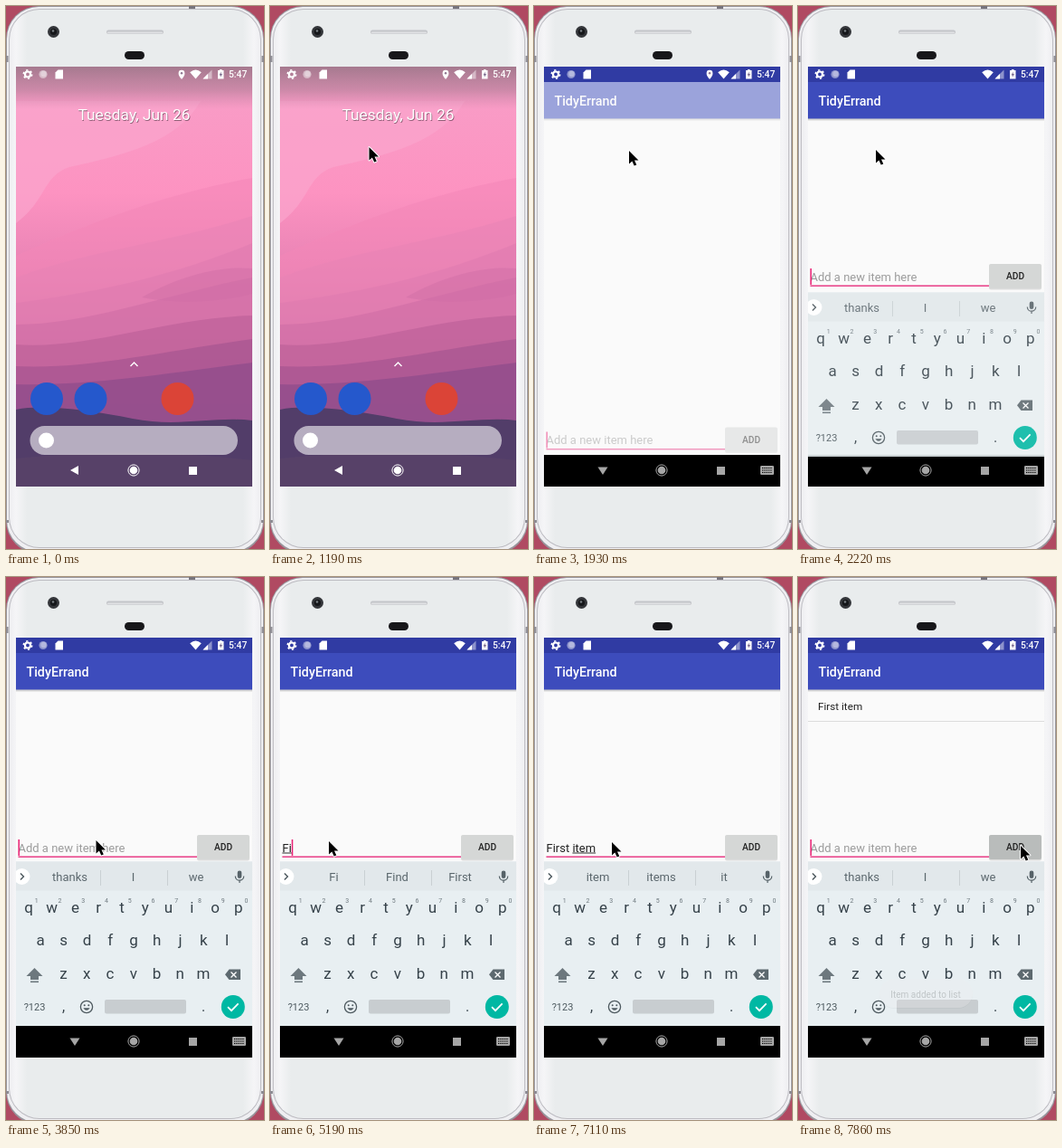
These frames come from a looping animation (285x600 px, 8 s). An HTML page:

```html
<!DOCTYPE html>
<html lang="en">
<head>
<meta charset="utf-8">
<title>To-do app on a phone</title>
<style>
  html, body { margin: 0; width: 100%; height: 100%; overflow: hidden; background: #b04a62; }
  svg { display: block; width: 100vw; height: 100vh; font-family: Roboto, sans-serif; }
  .mid { text-anchor: middle; }
  .med { font-weight: 500; }
</style>
</head>
<body>
<svg id="stage" viewBox="0 0 285 600" xmlns="http://www.w3.org/2000/svg"></svg>
<script>
const LOOP = 8000, STEP = 148, LAST = 53;

const text = (x, y, size, fill, str, more = '') =>
  `<text x="${x}" y="${y}" font-size="${size}" fill="${fill}" ${more}>${str}</text>`;
const rect = (x, y, w, h, fill, more = '') =>
  `<rect x="${x}" y="${y}" width="${w}" height="${h}" fill="${fill}" ${more}/>`;
const disc = (x, y, r, fill, more = '') =>
  `<circle cx="${x}" cy="${y}" r="${r}" fill="${fill}" ${more}/>`;
const path = (d, fill, more = '') => `<path d="${d}" fill="${fill}" ${more}/>`;
const stroke = (d, color, w = 1, more = '') =>
  `<path d="${d}" fill="none" stroke="${color}" stroke-width="${w}" ${more}/>`;
const fade = (id, stops) =>
  `<linearGradient id="${id}" x2="0" y2="1">${stops.map(([o, c, a = 1]) =>
    `<stop offset="${o}" stop-color="${c}" stop-opacity="${a}"/>`).join('')}</linearGradient>`;

function defs() {
  return `<defs>
    ${fade('sky', [[0, '#f79fc8'], [.3, '#fd93c1'], [.5, '#e681b3'], [.62, '#c8689d'], [.7, '#a8538c'], [.78, '#7f4686'], [.84, '#644184'], [1, '#5a4370']])}
    ${fade('scrim', [[0, '#6f6068', .6], [.55, '#7d6672', .36], [1, '#a07088', 0]])}
    ${fade('drop', [[0, '#000', .22], [1, '#000', 0]])}
    <linearGradient id="shell">
      <stop offset="0" stop-color="#eeeef1"/><stop offset=".025" stop-color="#f5f5f7"/>
      <stop offset=".07" stop-color="#e9eced"/><stop offset=".93" stop-color="#e9eced"/>
      <stop offset=".975" stop-color="#f5f5f7"/><stop offset="1" stop-color="#eeeef1"/>
    </linearGradient>
    <clipPath id="glass"><rect x="11" y="67" width="261" height="464"/></clipPath>
  </defs>`;
}

function phone() {
  return rect(0, 0, 285, 600, '#b04a62')
    + rect(0, 0, 285, 605, '#98959c', 'rx="36"')
    + rect(1, 1, 283, 602, '#efeff2', 'rx="35"')
    + rect(3, 3, 279, 596, '#bcbbc1', 'rx="34"')
    + rect(4, 4, 277, 594, 'url(#shell)', 'rx="33"')
    + rect(202, 0, 7, 3, '#77747c') + rect(0, 55, 2.5, 7, '#8d8b92') + rect(282.5, 55, 2.5, 7, '#8d8b92')
    + rect(0, 568, 3, 3, '#8d8b92') + rect(282, 568, 3, 3, '#8d8b92')
    + disc(52.5, 28.5, 6.5, '#34363a') + disc(52.5, 28.5, 3.6, '#15171a') + disc(52, 27.5, 1.3, '#777d82')
    + rect(111, 26.5, 63, 4.5, '#c3c5c9', 'rx="2.2"') + rect(112, 28.5, 61, 2, '#e0e1e4', 'rx="1"')
    + rect(131, 50, 22, 9, '#17171a', 'rx="4.5"');
}

function wallpaper() {
  const bands = [
    [276, 240, 206, 190, '#f487b8', .55], [300, 270, 262, 232, '#e883b5', .5],
    [328, 318, 300, 262, '#dd7bb0', .5], [352, 352, 318, 300, '#cc6ba3', .5],
    [374, 380, 344, 342, '#b65a94', .5], [398, 402, 380, 368, '#9c4e8c', .5],
    [418, 420, 406, 394, '#804788', .5]
  ];
  return rect(11, 67, 261, 464, 'url(#sky)')
    + path('M11 105H215C190 150 130 165 70 178C40 188 45 215 11 240Z', '#fba6cd', 'opacity=".7"')
    + bands.map(([a, b, c, d, fill, o]) =>
        path(`M11 ${a}C90 ${b} 180 ${c} 272 ${d}V531H11Z`, fill, `opacity="${o}"`)).join('')
    + path('M150 322C180 304 230 286 272 290V318C230 330 180 328 150 322Z', '#cf6ea4', 'opacity=".45"')
    + path('M11 446C40 440 90 446 140 456S230 453 272 458V531H11Z', '#523d69')
    + path('M11 500Q140 486 272 502V531H11Z', '#5b4468', 'opacity=".7"')
    + rect(11, 67, 261, 47, 'url(#scrim)');
}

function launcher() {
  return wallpaper()
    + text(142.2, 127, 17.4, '#4c3040', 'Tuesday, Jun 26', 'class="mid" opacity=".6"')
    + text(141.5, 126, 17.4, '#fff', 'Tuesday, Jun 26', 'class="mid"')
    + stroke('M137.5 398l4-4 4 4', '#fff', 1.4)
    + disc(45, 434, 18, '#2558cc') + disc(93.5, 434, 18, '#2558cc') + disc(189.5, 434, 18, '#db4437')
    + rect(26.5, 464, 229.5, 32, '#fff', 'rx="16" opacity=".58"')
    + disc(44.5, 480, 8.5, '#fff');
}

const homeKeys = color =>
  disc(141, 513, 4.3, color) + disc(141, 513, 6.1, 'none', `stroke="${color}" stroke-width="1"`)
  + rect(202, 509, 9, 9, color);

function navBar() {
  const grey = '#a6a6a6';
  const keys = [0, 1, 2].map(r =>
    stroke(`M252 ${510.5 + r * 2.5}H263`, '#000', 1.2, 'stroke-dasharray="1.3 1"')).join('');
  return rect(11, 496, 261, 35, '#000')
    + path('M70.5 509.5H81.5L76 518Z', grey) + homeKeys(grey)
    + rect(250, 508, 15, 10, grey, 'rx="1.2"') + keys;
}

function statusIcons() {
  const w = '#fff';
  return disc(24, 75.5, 3, 'none', 'stroke="#fff" stroke-width="2.2"')
    + disc(24, 75.5, 4.7, 'none', 'stroke="#fff" stroke-width="1.6" stroke-dasharray="2.2 2.72"')
    + disc(41, 75.5, 4.6, w, 'opacity=".45"') + disc(41.5, 75, 3.2, w, 'opacity=".35"')
    + path('M57.5 70.5H63V80.5H54.5V73.5Z', w)
    + `<g id="pin">${path('M194 81C191 77.5 190.6 76 190.6 74.2A3.4 3.4 0 0 1 197.4 74.2C197.4 76 197 77.5 194 81Z', w)}${disc(194, 74.2, 1.2, '#8f7690')}</g>`
    + path('M203.2 73.2Q209.5 67.6 215.8 73.2L209.5 80.6Z', w)
    + path('M217.5 80.5L227.5 70.5V80.5Z', w, 'opacity=".45"') + path('M217.5 80.5L223 75V80.5Z', w)
    + path('M236 70H238.5V71H240.5V80.5H234V71H236Z', w) + path('M237.8 72.5L235.5 76.5H237L236.7 79L239 75H237.5Z', '#77688c')
    + text(246, 79.2, 10.3, w, '5:47', 'class="med"');
}

function appBody() {
  return rect(11, 84, 261, 40.5, '#3d4cbc')
    + rect(11, 124.5, 261, 3, 'url(#drop)')
    + text(22.5, 110, 14.3, '#fff', 'TidyErrand', 'class="med"')
    + `<g id="row">${text(22, 146.5, 11.7, '#222', 'First item')}${rect(11, 159, 261, 1, '#dcdcdc')}</g>`
    + `<g id="entry">`
    + text(13.5, 303.5, 13, '#9c9c9c', 'Add a new item here', 'id="hint"')
    + text(13.5, 303.5, 13, '#222', '', 'id="typed" xml:space="preserve"')
    + rect(0, 304.5, 0, 1, '#333', 'id="under"')
    + rect(13.5, 308.5, 197.5, 1.4, '#e8307f')
    + rect(13.5, 290, 1.5, 18, '#e91e72', 'id="caret"')
    + rect(211, 286, 58, 27.5, '#000', 'rx="2" opacity=".12"')
    + rect(211, 285, 58, 27, '#d5d7d6', 'rx="2" id="button"')
    + text(240, 302, 10.2, '#222', 'ADD', 'class="mid med"') + `</g>`;
}

function keyboard() {
  const ink = '#36424a', dim = '#6d787e';
  const keys = (letters, x, y) => [...letters].map((c, i) =>
    text(x + i * 25.75, y, 17, ink, c, 'class="mid"')).join('');
  const digits = [...'1234567890'].map((c, i) =>
    text(33.8 + i * 25.75, 359.5, 7, dim, c, 'class="mid"')).join('');
  return rect(11, 314.5, 261, 181.5, '#e8eff2') + rect(11, 314.5, 261, 32, '#e2e8eb')
    + disc(17.5, 331, 9, '#fff') + stroke('M16 327.5l3.5 3.5-3.5 3.5', '#4a565c', 1.4)
    + rect(104, 324, 1, 17, '#c9d0d3') + rect(178, 324, 1, 17, '#c9d0d3')
    + [70.5, 140.5, 210].map((x, i) => text(x, 335.5, 13, '#5b676d', '', `class="mid" id="s${i}"`)).join('')
    + rect(255.7, 324.5, 4.6, 8.5, '#566268', 'rx="2.3"') + stroke('M253.3 330.5a4.7 4.7 0 0 0 9.4 0M258 335.2V338', '#566268', 1.2)
    + keys('qwertyuiop', 25, 371) + digits + keys('asdfghjkl', 38, 407) + keys('zxcvbnm', 63.5, 444)
    + path('M31.5 432L40.5 441H36V445H27V441H22.5Z', dim) + rect(27, 446.5, 9, 1.6, dim)
    + path('M246.5 433.5H259V445H246.5L242 439.2Z', '#5d696f') + stroke('M248.5 436.5l6 6m0-6l-6 6', '#fff', 1.3)
    + text(31.5, 479, 11, '#4d595f', '?123', 'class="mid"')
    + text(63.5, 480, 16, ink, ',', 'class="mid"') + text(218, 480, 16, ink, '.', 'class="mid"')
    + disc(89, 475, 6.6, 'none', 'stroke="#4d595f" stroke-width="1.3"')
    + disc(86.7, 473.3, 1, '#4d595f') + disc(91.3, 473.3, 1, '#4d595f') + path('M85.3 476.2H92.7Q89 481.4 85.3 476.2Z', '#4d595f')
    + rect(109, 467, 90, 15.5, '#c8cdd0', 'rx="2"')
    + disc(250.8, 475, 13, '#00b8a3') + stroke('M245 475.2l4 4 7.6-7.8', '#fff', 1.7);
}

const toast = rect(90, 445, 103, 32, '#000', 'rx="16" opacity=".12"')
  + rect(90, 444, 103, 32, '#eeeeee', 'rx="16"')
  + text(141, 465, 10, '#444', 'Item added to list', 'class="mid"');

document.getElementById('stage').innerHTML = defs() + phone() + `<g clip-path="url(#glass)">
  ${launcher()}
  ${path('M80 508V518L71 513Z', '#fff')}${homeKeys('#fff')}
  <g id="app">${rect(11, 67, 261, 464, '#fafafa')}${rect(11, 67, 261, 17, '#303ba3')}<g id="body">${appBody()}</g></g>
  <g id="nav">${navBar()}</g>
  ${statusIcons()}
  <g id="board">${keyboard()}</g>
  <g id="toast">${toast}</g></g>
  ${path('M0 0V14.5L3.4 11.4L5.7 16.6L8.3 15.4L6 10.4H10.5Z', '#000', 'id="mouse" stroke="#fff" stroke-width="1.8" paint-order="stroke" stroke-linejoin="round"')}`;

const el = {};
document.querySelectorAll('svg [id]').forEach(n => el[n.id] = n);

// Tracks hold [tick, ...values]
const tracks = {
  mouse: [[3, 212, 353], [5, 178, 270], [7, 120, 172], [8, 109.5, 156], [11, 109.5, 156], [13, 105, 160],
    [15, 86, 159], [17, 86, 159], [18, 89, 192], [19, 96, 256], [20, 99.5, 291], [26, 99.5, 291],
    [28, 82, 297], [30, 65, 292], [47, 65, 292], [48, 86, 293], [50, 205, 296], [51, 246, 297]],
  app: [[9, 300, 0], [10, 139, .96], [11, 38, 1], [12, 5, 1], [13, 0, 1]],
  body: [[12, 0], [13, .5], [14, 1]],
  nav: [[11, 0], [12, .6], [13, 1]],
  board: [[13, 18, 0], [14, 9, .45], [15, 2, .88], [16, 0, 1]],
  toast: [[52, 0], [53, .24]]
};
const typing = [[0, ''], [33, 'F'], [35, 'Fi'], [36, 'Firs'], [37, 'First'], [38, 'First '], [39, 'First i'],
  [41, 'First it'], [44, 'First ite'], [45, 'First item'], [52, '']];
const hints = [[0, 'thanks', 'I', 'we'], [33, 'F', 'I', 'For'], [35, 'Fi', 'Find', 'First'], [36, 'Firs', 'First', 'Fire'],
  [37, 'First', 'Firsts', 'Fist'], [38, 'of', 'time', 'thing'], [39, 'I', 'in', 'is'], [41, 'it', "it's", 'I'],
  [44, 'item', 'ite', 'items'], [45, 'item', 'items', 'it'], [52, 'thanks', 'I', 'we']];
const blinks = [[0, 1], [17, 0], [20, 1], [23, 0], [26, 1], [29, 0], [33, 1], [48, 0], [51, 1]];

const latest = (list, n) => list.filter(k => k[0] <= n).pop().slice(1);

function at(name, n) {
  const keys = tracks[name];
  if (n <= keys[0][0]) return keys[0].slice(1);
  const j = keys.findIndex(k => k[0] >= n);
  if (j < 0) return keys[keys.length - 1].slice(1);
  const a = keys[j - 1], b = keys[j], p = (n - a[0]) / (b[0] - a[0]);
  return a.slice(1).map((v, i) => v + (b[i + 1] - v) * p);
}

const alpha = (id, v) => el[id].setAttribute('opacity', v);
const move = (id, x, y) => el[id].setAttribute('transform', `translate(${x} ${y})`);

function draw(n) {
  const [appY, appA] = at('app', n), [keyY, keyA] = at('board', n);
  move('mouse', ...at('mouse', n));
  alpha('mouse', n >= 3 ? 1 : 0);
  move('app', 0, appY);
  alpha('app', appA);
  alpha('body', at('body', n)[0]);
  alpha('nav', at('nav', n)[0]);
  alpha('pin', n < 14 ? 1 : 0);
  move('entry', 0, n < 14 ? 180.5 : 0);
  move('board', 0, keyY);
  alpha('board', keyA);
  alpha('row', n >= 52 ? 1 : 0);
  alpha('toast', at('toast', n)[0]);
  el.button.setAttribute('fill', n >= 51 ? '#b9bcbb' : '#d5d7d6');

  const [str] = latest(typing, n);
  const width = s => {
    el.typed.textContent = s;
    return s ? el.typed.getComputedTextLength() : 0;
  };
  const start = width(str.slice(0, str.lastIndexOf(' ') + 1)), end = width(str);
  el.under.setAttribute('x', 13.5 + start);
  el.under.setAttribute('width', Math.max(0, end - start));
  el.caret.setAttribute('x', 13.5 + end);
  alpha('caret', latest(blinks, n)[0]);
  alpha('hint', str ? 0 : 1);
  latest(hints, n).forEach((s, i) => el['s' + i].textContent = s);
}

function loop() {
  const t = performance.now() % LOOP;
  draw(Math.min(LAST, Math.floor((t + 12) / STEP)));
  requestAnimationFrame(loop);
}
loop();
</script>
</body>
</html>
```
